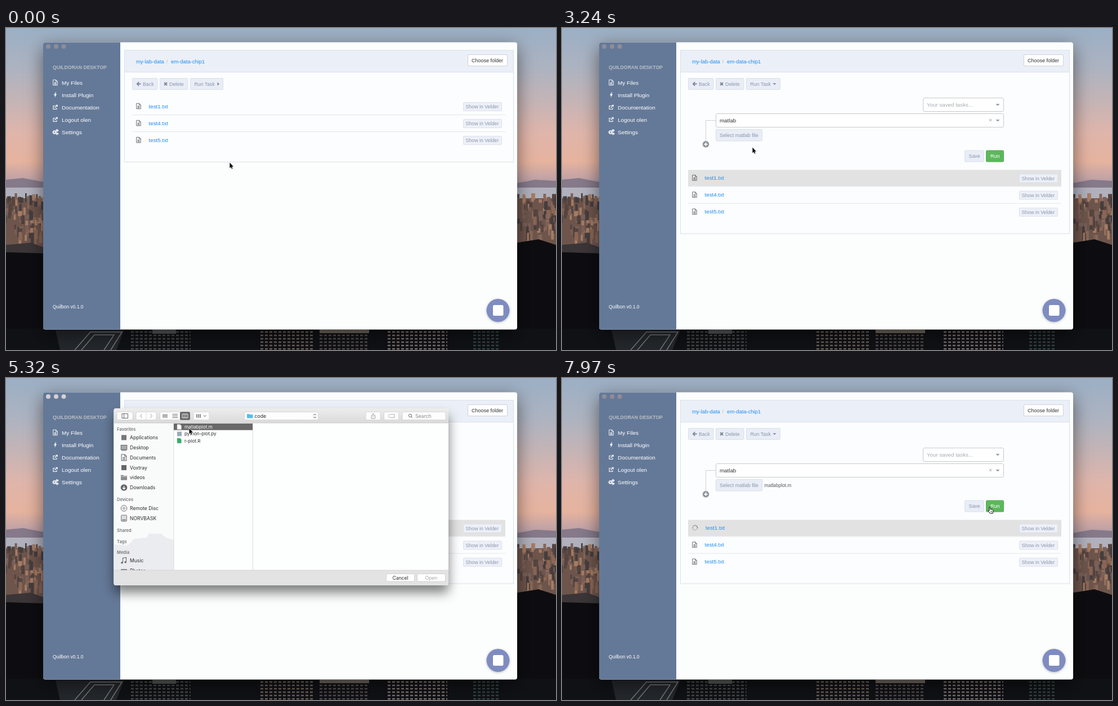
An HTML page that plays this animation: 977 px wide and 573 px high, repeating every 8 s.

```html
<!DOCTYPE html>
<html lang="en">
<head>
<meta charset="utf-8">
<title>Run a task</title>
<style>
html, body { margin: 0; width: 100%; height: 100%; overflow: hidden; background: #0d0d10; }
svg { display: block; width: 977px; height: 573px; }
text { white-space: pre; }
</style>
</head>
<body>
<svg id="stage" viewBox="0 0 977 573" xmlns="http://www.w3.org/2000/svg"></svg>
<script>
const LOOP = 8000;
const SANS = "'Liberation Sans', Arial, sans-serif";
const UI = "Inter, Roboto, sans-serif";
const LINK = '#1c8df2', MUTED = '#8b96ad', ICON = '#606468';

const rect = (x, y, w, h, fill, more = '') =>
  `<rect x="${x}" y="${y}" width="${w}" height="${h}" fill="${fill}" ${more}/>`;
const text = (x, y, s, size, fill, more = '', font = SANS) =>
  `<text x="${x}" y="${y}" font-size="${size}" fill="${fill}" font-family="${font}" ${more}>${s}</text>`;
const ui = (x, y, s, size, fill = '#2b2b2b', more = '') => text(x, y, s, size, fill, more, UI);
const path = (d, fill, more = '') => `<path d="${d}" fill="${fill}" ${more}/>`;
const line = (d, color, w = 1, more = '') =>
  path(d, 'none', `stroke="${color}" stroke-width="${w}" ${more}`);
const circle = (x, y, r, fill, more = '') =>
  `<circle cx="${x}" cy="${y}" r="${r}" fill="${fill}" ${more}/>`;
const group = (id, body, more = '') => `<g id="${id}" ${more}>${body}</g>`;
const at = (x, y, body) => `<g transform="translate(${x} ${y})">${body}</g>`;
const button = (x, y, w, h, fill = '#e9edf6', stroke = '#d9dfeb') =>
  rect(x + .5, y + .5, w - 1, h - 1, fill, `stroke="${stroke}" rx="1.5"`);
const gradient = (id, stops) => `<linearGradient id="${id}" x2="0" y2="1">${
  stops.map(([o, c]) => `<stop offset="${o}" stop-color="${c}"/>`).join('')}</linearGradient>`;
const shadow = (id, dy, blur, alpha) =>
  `<filter id="${id}" x="-20%" y="-20%" width="140%" height="150%">
    <feDropShadow dx="0" dy="${dy}" stdDeviation="${blur}" flood-opacity="${alpha}"/></filter>`;

const defs = `<defs>
  ${gradient('sky', [[0, '#9bafc5'], [.25, '#adb3c0'], [.45, '#c5b4b6'], [.65, '#e0b5aa'],
    [.82, '#e6b39e'], [.92, '#c3a3a5'], [1, '#9a8e9c']])}
  ${gradient('bar', [[0, '#ededed'], [1, '#dadada']])}
  ${shadow('winShadow', 9, 16, .5)}
  ${shadow('sheetShadow', 13, 10, .5)}
  ${shadow('soft', 1, 2, .25)}
  <clipPath id="win"><rect x="66" y="25.5" width="842" height="511" rx="4"/></clipPath>
  <clipPath id="side"><rect x="192" y="80" width="106" height="262"/></clipPath>
</defs>`;

function randomizer(seed) {
  return () => (seed = (seed * 16807) % 2147483647) / 2147483647;
}

// Dusk skyline, reduced to flat blocks.
function backdrop() {
  const rnd = randomizer(71);
  const tones = ['#8a6655', '#55443f', '#a67c63', '#463d3d', '#7a6058'];
  let s = rect(0, 0, 977, 290, 'url(#sky)');
  s += path('M0 270L30 267 66 274V290H0ZM908 276L940 270 977 272V290H908Z', '#85798a');
  s += rect(0, 284, 977, 22, '#b1b1bd') + rect(0, 303, 977, 90, '#6d554c');
  for (let i = 0; i < 150; i++) {
    const x = (i % 2 ? 907 : -2) + rnd() * 68, y = 294 + rnd() * 80;
    s += rect(x.toFixed(1), y.toFixed(1), (2.5 + rnd() * 5).toFixed(1),
      (6 + rnd() * 14).toFixed(1), tones[i % 5]);
  }
  s += path('M0 400L0 386 44 382 66 390V402Z', '#3b3537');
  s += path('M0 399L66 401V573H0ZM908 382L946 376 977 386V573H908Z', '#0d0d11');
  s += rect(0, 535, 977, 38, '#101115');
  s += path('M88 538H210L196 573H96Z', '#24272b') +
    line('M122 573L150 541H206L186 573M134 573L157 546H192L174 573', '#777a7b', 1.5);
  for (const [x, w, c] of [[222, 106, '#5c5c5c'], [452, 96, '#8c7a6c'], [557, 88, '#6a625e'],
    [678, 106, '#a0928a'], [830, 48, '#3e5955']]) {
    for (let y = 541; y < 573; y += 6)
      s += line(`M${x} ${y}H${x + w}`, c, 2.4, 'stroke-dasharray="5 3" opacity=".75"');
  }
  s += rect(260, 537, 42, 7, '#555758') + rect(557, 537, 88, 6, '#71675f');
  return s;
}

const docIcon = (color, s = 1) => `<g transform="scale(${s})">${
  line('M-3.8 -4.8H1.2L3.8 -2.2V4.8H-3.8ZM1 -4.8V-2H3.8M-2 0H2M-2 1.6H2M-2 3.2H2', color, .9)}</g>`;
const linkIcon = line('M0 -2.5H-3.5V3.5H2.5V1M-1 1L3.5 -3.5M.8 -3.7H3.7V-.8', '#fff', 1.1);
const gear = r => circle(0, 0, r, 'none', 'stroke="#fff" stroke-width="1.6"') +
  circle(0, 0, r + 1.2, 'none', 'stroke="#fff" stroke-width="1.1" stroke-dasharray="1.3 1.2"');
const triangle = (x, y, w, color) => path(`M${x - w} ${y - w / 2}h${2 * w}l${-w} ${w}Z`, color);

function sidebar() {
  const items = ['My Files', 'Install Plugin', 'Documentation', 'Logout olen', 'Settings'];
  const icons = [docIcon('#fff'), path('M.8 -5L-2.6 .8H-.4L-1 5 2.6 -1.5H.4L1.5 -5Z', '#fff'),
    linkIcon, linkIcon, at(-1.5, .5, gear(2)) + at(3.2, -2.6, gear(.8)) + at(3.2, 3, gear(.8))];
  return rect(66, 25, 137, 512, '#647998') +
    group('lights', [75, 89, 102.5].map(x => circle(x, 33, 4, 'inherit')).join('')) +
    text(83, 72.5, 'QUILDORAN DESKTOP', 8.6, '#b9bdc4', 'font-weight="bold"') +
    items.map((s, i) => at(87.5, 97 + 22 * i, icons[i]) +
      text(99, 100.8 + 22 * i, s, 9.95, '#fff')).join('') +
    text(83, 499, 'Quilbon v0.1.0', 8.45, '#fff');
}

function header() {
  return rect(210.5, 39.5, 691, 39, '#ebeff7', 'stroke="#d9e0ec"') +
    text(231, 62.5, 'my-lab-data', 9.45, LINK) + text(284.5, 62.5, '/', 9.45, '#b9c0ca') +
    text(293, 62.5, 'em-data-chip1', 9.45, LINK) +
    button(820, 47, 71, 21, '#fff', '#cfd2d6') + text(827, 60.8, 'Choose folder', 9, '#333') +
    button(224, 89, 45.5, 21) + text(243, 103, 'Back', 8.8, MUTED) +
    path('M231.5 99.5L235.5 95.5 236.8 96.8 235 98.6H239.5V100.5H235L236.8 102.2 235.5 103.5Z', '#7c869c') +
    button(273, 89, 50.5, 21) + text(290, 103, 'Delete', 8.9, MUTED) +
    line('M281.2 97L286 102M286 97L281.2 102', '#7c869c', 2) +
    group('runClosed', button(327, 89, 59, 21) + path('M375.5 96.5L379 99.5 375.5 102.5Z', '#7c869c')) +
    group('runOpen', button(327, 89, 61, 21) + triangle(377.5, 99.8, 3, '#7c869c')) +
    text(334.5, 103, 'Run Task', 8.75, MUTED);
}

function form() {
  const box = (x, y, w) => rect(x + .5, y + .5, w - 1, 24, '#fff', 'stroke="#c6cacd" rx="2.5"') +
    triangle(774, y + 12.8, 3.5, '#999');
  return box(641, 124, 144) + text(648, 140, 'Your saved tasks...', 9.76, '#a6abb0') +
    line('M273 164.5H255.5V180', '#cdd2d7') + box(273, 152, 512) +
    group('hint', text(280, 168, 'Select task...', 9.76, '#a6abb0')) +
    group('picked', line('M255.5 180V201', '#cdd2d7') + text(280, 168, 'matlab', 9.76, '#333') +
      line('M759 161.7L763.4 166.1M763.4 161.7L759 166.1', '#999', .9) +
      button(273, 180, 83, 21.5) + rect(274, 181, 81, 2, '#cbd2df', 'id="pressed"') +
      text(280, 194, 'Select matlab file', 9.05, MUTED)) +
    group('fileName', text(359.5, 193.5, 'matlabplot.m', 8.4, '#555')) +
    group('actions', circle(255.5, 186.3, 5.8, '#8e9499') +
      line('M252.3 186.3H258.7M255.5 183.1V189.5', '#fff', 1.7) +
      button(715, 197, 35, 21) + text(722.5, 210.8, 'Save', 8.9, MUTED) +
      button(753, 197, 32, 21, '#5cb85c', '#4faa4f') + text(761, 210.8, 'Run', 9, '#fff'));
}

function files() {
  return [1, 4, 5].map((n, i) => {
    const y = 139 + 30.1 * i, first = i === 0;
    return (first ? rect(224, 125, 663, 29, '#e2e2e2', 'id="selected"') : '') +
      (i < 2 ? line(`M224 ${y + 15.5}H887`, '#e3e7ea') : '') +
      group('icon' + i, at(235.5, y, docIcon(ICON))) +
      text(253.5, y + 3.6, `test${n}.txt`, 9.8, LINK, `id="name${i}"`) +
      button(812, y - 7, 69, 16, '#edf0f7', '#dbe1ec') +
      text(816.5, y + 4, 'Show in Velder', 8.8, MUTED);
  }).join('') + group('spinner', Array.from({ length: 8 }, (_, i) =>
    circle(0, -4.2, 1, '#555', `opacity="${.3 + i * .1}" transform="rotate(${i * 45})"`)).join(''));
}

function menu() {
  const options = ['convert', 'matlab', 'python', 'r', 'plot', 'average', 'merge', 'smooth'];
  return rect(273.5, 177.5, 511, 272, '#fff', 'stroke="#c6cacd"') +
    rect(274, 178, 510, 33, '#edf4fd', 'id="hover"') +
    options.map((s, i) => text(280, 198 + 34 * i, s, 9.76, '#666')).join('');
}

function sheetBar() {
  const b = (x, w) => rect(x, 60.5, w, 14, '#fdfdfd', 'rx="2.5" stroke="#c9c9c9" stroke-width=".6"');
  const squares = (x, y) => [0, 1, 2].map(i =>
    rect(x + 3 * i, y, 2, 2, '#555') + rect(x + 3 * i, y + 3.2, 2, 2, '#555')).join('');
  return path('M191.5 80V58Q191.5 54 195.5 54H782Q786 54 786 58V80Z', 'url(#bar)') +
    line('M191.5 80H786', '#c3c3c3', .8) +
    b(197, 28) + line('M206 63.5H216.5V71.5H206ZM209.5 63.5V71.5', '#555', .9) +
    b(231, 36) + line('M249 60.5V74.5', '#ccc', .6) +
    line('M241.5 64L238.5 67.5 241.5 71', '#999') + line('M256.5 64L259.5 67.5 256.5 71', '#999') +
    b(273.5, 53) + squares(278.5, 65) + line('M295.5 64.5H305M295.5 67.5H305M295.5 70.5H305', '#555', .9) +
    rect(309, 60.3, 18, 14.4, '#666', 'rx="2.5"') +
    line('M313 64H323V71H313ZM316.3 64V71M319.7 64V71', '#fff', .9) +
    b(333, 28) + squares(338, 65) + line('M351 66.3L353.3 68.7 355.6 66.3', '#555') +
    b(423.5, 131) + path('M428 64H432L433 65H438.5V71.5H428Z', '#58bdea') +
    ui(441.5, 70.6, 'code', 8.7) +
    line('M546.3 66.3L548.5 64 550.7 66.3M546.3 68.9L548.5 71.2 550.7 68.9', '#444') +
    b(639, 26) + line('M650.5 66.5H649V72H655.5V66.5H654M652.2 69.5V63.5M650.5 65L652.2 63.3 654 65', '#888', .8) +
    b(671.5, 26) + line('M679 67.5L681.5 64.7H690V70.3H681.5Z', '#999', .8) +
    b(704, 77) + circle(718, 66.8, 2.6, 'none', 'stroke="#666"') + line('M720 68.8L722 71', '#666') +
    ui(727, 70.6, 'Search', 8.6, '#888');
}

function sheetSide() {
  const head = (y, s) => ui(197, y, s, 7.5, '#777', 'font-weight="600"');
  const item = (y, s, icon) => ui(220, y + 3.1, s, 8.6) + at(209.5, y, icon);
  const disc = circle(0, 0, 5.3, '#eee', 'stroke="#777"');
  const folder = path('M-5.5 -4.5H-1.5L-.5 -3.3H5.5V4.5H-5.5Z', '#8b8b8b') + line('M-5 -1.8H5', '#ddd', .8);
  const screen = rect(-5.3, -4.5, 10.6, 8, '#aaa', 'stroke="#666"') + line('M-4.5 5H4.5', '#666');
  const note = line('M-2 3.5V-4.5L4 -5.5V2.5', '#666', 1.1) + circle(-3.5, 3.7, 1.7, '#666') + circle(2.6, 2.7, 1.7, '#666');
  const camera = rect(-5.5, -3, 11, 8, '#777', 'rx="1"') + circle(0, 1, 2.3, '#eee');
  return rect(192, 80, 106, 262, '#f9fafa') +
    path('M192 296L216 298 228 286 250 284 254 277H276L284 284 298 288V342H192Z', '#ebecf0') +
    `<g clip-path="url(#side)">` +
    head(93.5, 'Favorites') +
    item(106, 'Applications', rect(-4.5, -4.5, 9, 9, '#777')) +
    item(124, 'Desktop', screen) + item(141.5, 'Documents', docIcon('#666', 1.15)) +
    item(159.5, 'Voxtray', rect(-4.5, -4.5, 9, 9, '#666')) + item(177.3, 'videos', folder) +
    item(195, 'Downloads', circle(0, 0, 5.8, '#666') + line('M0 -3V2.6M-2.5 .3L0 2.8 2.5 .3', '#fff', 1.3)) +
    head(219.3, 'Devices') + item(231.8, 'Remote Disc', disc + circle(0, 0, 1.6, '#fff', 'stroke="#777"')) +
    item(249.6, 'NORVBASK', rect(-4.8, -5.5, 9.6, 11, '#ddd', 'stroke="#777" rx="1"') + line('M-3 3H3', '#666', 1.6)) +
    group('shared', head(274.3, 'Shared')) +
    group('lower', head(293.6, 'Tags') + head(312.7, 'Media') + item(325, 'Music', note) +
      item(343, 'Photos', camera) + item(361, 'Movies', screen)) + '</g>';
}

function sheet() {
  const page = (x, y, c) => path(`M${x} ${y - 4.5}h5l2.5 2.5v6.5h-7.5Z`, c, 'stroke="#bbb" stroke-width=".5"');
  const b = (x, s, c) => rect(x, 348.5, 50, 13.5, '#fff', 'rx="2.5" stroke="#c6c6c6" stroke-width=".7"') +
    ui(x + 25, 358.6, s, 8.6, c, 'text-anchor="middle"');
  return rect(191.5, 54, 594.5, 315, '#fff', 'rx="4" filter="url(#sheetShadow)"') +
    rect(191.5, 80, 594.5, 262, '#fdfefe') + sheetSide() + sheetBar() +
    line('M298 80V342M438.5 80V342', '#dcdcdc') +
    rect(298, 81, 140, 11.7, '#686868', 'id="fileRow"') +
    page(304, 87, '#fff') + rect(304, 95.5, 8, 8, '#9cabb9') + page(304, 111.5, '#2fae68') +
    ui(317, 90, 'matlabplot.m', 8.15, '#2b2b2b', 'id="fileLabel"') +
    ui(317, 102.3, 'python-plot.py', 8.15) + ui(317, 114.7, 'r-plot.R', 8.15) +
    path('M191.5 342H786V365Q786 369 782 369H195.5Q191.5 369 191.5 365Z', '#e3e3e3') +
    line('M191.5 342H786', '#cfcfcf', .8) +
    b(675.5, 'Cancel', '#2b2b2b') + b(730.5, 'Open', '#a5a5a5');
}

const outline = 'stroke="#fff" stroke-width="1.2" paint-order="stroke" stroke-linejoin="round"';
const cursor =
  group('arrow', path('M.4 .6V10.4L2.6 8.4 4.1 11.8 5.6 11.1 4.2 7.8H7.1Z', '#111', outline)) +
  group('hand', path('M2 1Q3.2 -.5 4 1V4.5Q8.5 4.6 9 6.5V9L8 12H3.5L0 7.5Q0 6 2 7.2Z', '#fff',
    'stroke="#111" stroke-width="1" stroke-linejoin="round"') + line('M5 7.5V10M6.8 7.5V10', '#111', .7)) +
  group('resize', at(4.5, 6, path('M-5.5 0L-2.5 -3V-.8H-.8V-5.5H.8V-.8H2.5V-3L5.5 0 2.5 3V.8H.8V5.5H-.8V.8H-2.5V3Z',
    '#000', outline)));

document.getElementById('stage').innerHTML = defs + backdrop() +
  rect(66, 25.5, 842, 511, '#fcfefe', 'rx="4" filter="url(#winShadow)"') +
  '<g clip-path="url(#win)">' + sidebar() +
  rect(210.5, 78.5, 691, 160, '#fcfdfe', 'id="panel" stroke="#d9e0ec"') +
  header() + group('form', form()) + group('files', files()) + group('menu', menu()) + '</g>' +
  circle(874, 502.5, 20.5, '#7f8cc1', 'filter="url(#soft)"') +
  rect(865, 493, 18.5, 19, '#fff', 'rx="2.5"') +
  group('sheet', sheet()) + group('cursor', cursor);

const el = {};
document.querySelectorAll('#stage [id]').forEach(n => { el[n.id] = n; });
const show = (id, on) => { el[id].style.display = on ? '' : 'none'; };
const set = (id, name, value) => el[id].setAttribute(name, value);
const shift = (id, x, y) => set(id, 'transform', `translate(${x} ${y})`);

// Pointer moves in even jumps: first jump, last jump, jumps, from, to.
const moves = [
  [300, 980, 5, 397, 239, 372, 141],
  [1270, 1577, 3, 372, 141, 356, 98],
  [1883, 2190, 3, 356, 98, 342, 163],
  [2490, 2790, 2, 342, 163, 338, 212],
  [3384, 3830, 4, 338, 212, 328, 190],
  [4273, 4880, 5, 328, 190, 325, 88],
  [5030, 5030, 1, 325, 88, 325, 89],
  [5820, 6460, 5, 325, 89, 757, 243],
  [6620, 6620, 1, 757, 243, 757, 229]
];

function pointer(t) {
  let p = [397, 239];
  for (const [a, b, n, x0, y0, x1, y1] of moves) {
    if (t < a) break;
    const k = n > 1 ? Math.min(n, Math.floor((t - a) * (n - 1) / (b - a) + .02) + 1) / n : 1;
    p = [x0 + (x1 - x0) * k, y0 + (y1 - y0) * k];
  }
  return p;
}

function draw(t) {
  const within = (a, b) => t >= a && t < b;
  const open = t >= 1730, picked = t >= 3087, dialog = within(4120, 5520), busy = t >= 7520;
  const drop = picked ? 127.5 : open ? 107 : 0;

  set('lights', 'fill', within(3970, 5520) ? '#d3d0d4' : '#918c98');
  show('selected', t >= 980);
  show('runClosed', !open);
  show('runOpen', open);
  show('form', open);
  show('hint', !picked);
  show('picked', picked);
  show('pressed', within(3970, 4270));
  show('fileName', t >= 5520);
  shift('actions', 0, picked ? 20.5 : 0);
  shift('files', 0, drop);
  set('panel', 'height', 160 + drop);
  show('menu', within(2340, 3087));
  set('hover', 'y', t >= 2790 ? 212 : 178);

  show('icon0', !busy);
  show('spinner', busy);
  set('name0', 'x', busy ? 255 : 253.5);
  set('spinner', 'transform', `translate(236.3 139) rotate(${Math.floor((t - 7520) / 150) * 45})`);

  show('sheet', dialog);
  const zoom = t < 4260 ? .57 : 1, listed = t >= 4425, chosen = t >= 5320;
  set('sheet', 'transform', `translate(488.7 211.5) scale(${zoom}) translate(-488.7 -211.5)`);
  set('sheet', 'opacity', zoom < 1 ? .84 : 1);
  show('shared', listed);
  shift('lower', 0, listed ? 0 : -19);
  show('fileRow', chosen);
  set('fileLabel', 'fill', chosen ? '#fff' : '#2b2b2b');

  const resize = within(4120, 4273), hand = within(3681, 4120) || t >= 6620;
  show('resize', resize);
  show('hand', hand);
  show('arrow', !resize && !hand);
  shift('cursor', ...pointer(t));
}

const start = performance.now();
function tick() {
  draw((performance.now() - start) % LOOP);
  requestAnimationFrame(tick);
}
tick();
</script>
</body>
</html>
```
